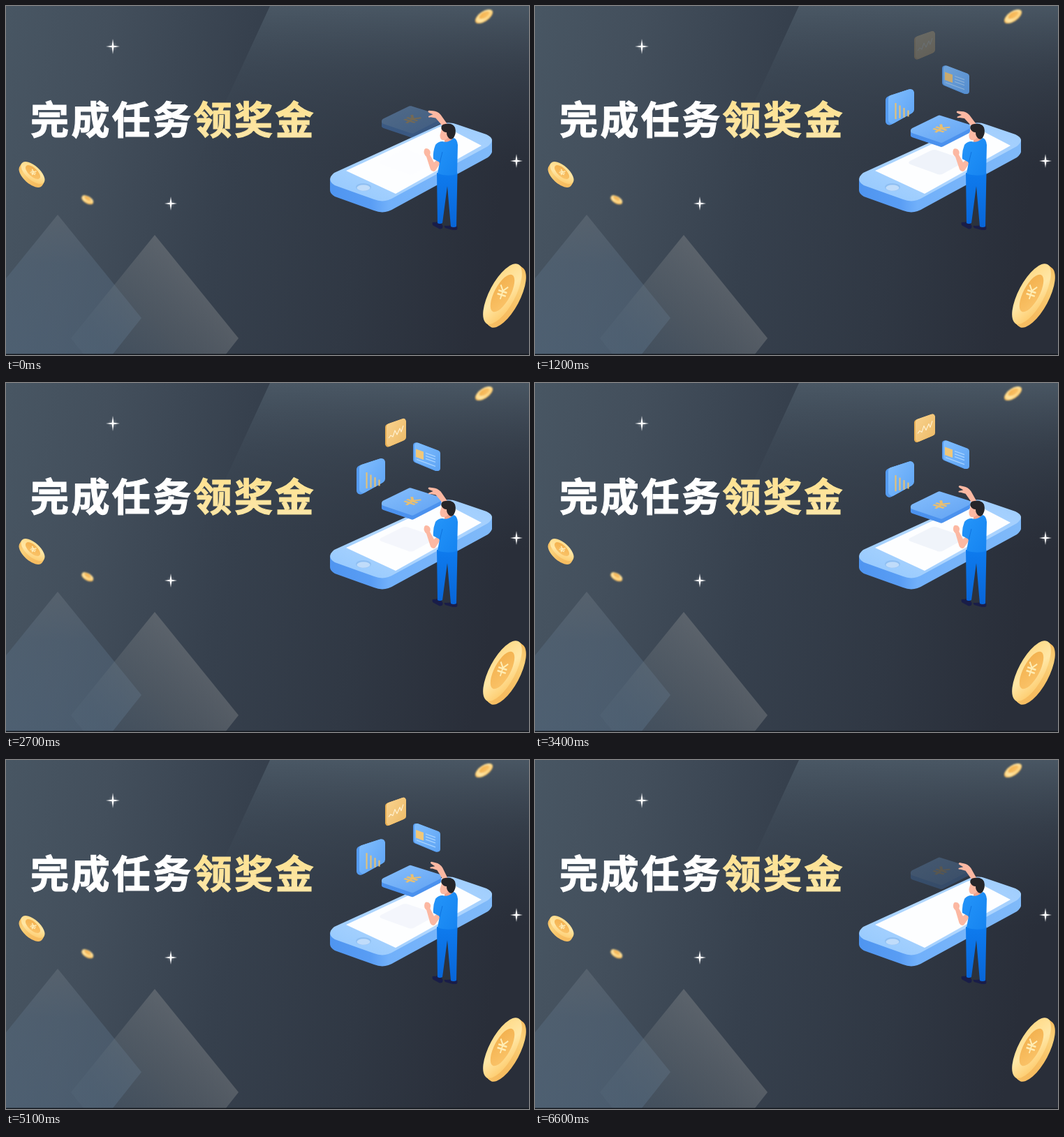
An HTML page for the animation above (6700 ms loop, 749 by 500 pixels).

```html
<!DOCTYPE html>
<html lang="zh">
<head>
<meta charset="utf-8">
<style>
html, body { margin: 0; width: 100%; height: 100%; overflow: hidden; background: #36404c; }
svg { display: block; width: 749px; height: 500px; }
.title { font: 900 55px "Noto Sans CJK SC", "Noto Sans CJK", sans-serif; letter-spacing: 3.4px; stroke-width: 1.2px; }
</style>
</head>
<body>
<svg id="stage" viewBox="0 0 749 500"></svg>
<script>
const LOOP = 6700, STEP = 100, RESET = 6450;

const gradient = (id, [x1, y1, x2, y2], ...stops) =>
  `<linearGradient id="${id}" x1="${x1}" y1="${y1}" x2="${x2}" y2="${y2}">` +
  stops.map(([at, color, alpha = 1]) =>
    `<stop offset="${at}" stop-color="${color}" stop-opacity="${alpha}"/>`).join('') +
  '</linearGradient>';

const shape = (d, fill, extra = '') => `<path d="${d}" fill="${fill}" ${extra}/>`;
const line = (d, color, width, extra = '') =>
  `<path d="${d}" fill="none" stroke="${color}" stroke-width="${width}" ${extra}/>`;

// A rounded slab: its face repeated along the depth direction.
function slab(points, face, side, dx, dy, round) {
  const poly = (x, y, fill) => `<polygon points="${points}" transform="translate(${x} ${y})" ` +
    `fill="${fill}" stroke="${fill}" stroke-width="${round}" stroke-linejoin="round"/>`;
  const depth = Math.max(Math.abs(dx), Math.abs(dy));
  let out = '';
  for (let i = depth; i > 0; i--) out += poly(dx * i / depth, dy * i / depth, side);
  return out + poly(0, 0, face);
}

const yen = (transform, color, width = 3) =>
  `<g transform="${transform}">${line('M-7 -9L0 -2L7 -9M0 -2V10M-8 -1H8M-8 4H8', color, width)}</g>`;

function coin(x, y, rx, ry, turn, dx, dy, mark, blur) {
  const oval = (cx, cy, k, fill) =>
    `<ellipse cx="${cx}" cy="${cy}" rx="${rx * k}" ry="${ry * k}" transform="rotate(${turn} ${cx} ${cy})" fill="${fill}"/>`;
  let edge = '';
  for (let i = 6; i > 0; i--) edge += oval(x + dx * i / 6, y + dy * i / 6, 1, 'url(#coinEdge)');
  return `<g ${blur ? `filter="url(#${blur})"` : ''}>${edge}${oval(x, y, 1, 'url(#coinFace)')}` +
    `${oval(x, y - 1, .62, 'url(#coinCore)')}${mark}</g>`;
}

const sparkle = (x, y, r) => `<g transform="translate(${x} ${y})">
  <circle r="${r * .6}" fill="#fff" opacity=".15" filter="url(#soft)"/>
  ${shape(`M0 ${-r - 2}L1.3 -1.3L${r + 1} 0L1.3 1.3L0 ${r + 2}L-1.3 1.3L${-r - 1} 0L-1.3 -1.3Z`, '#fff')}</g>`;

const defs = `<defs>
  ${gradient('base', [0, 0, 1, .12], [0, '#485663'], [.2, '#434f5c'], [.48, '#36404d'], [.75, '#303844'], [1, '#292e39'])}
  ${gradient('sheen', [0, 0, 0, 1], [0, '#4c5a67', .9], [.4, '#404c59', .5], [1, '#333c48', 0])}
  ${gradient('peakA', [.5, 0, .5, 1], [0, '#717b85', .4], [.35, '#5a6e82', .45], [1, '#587088', .45])}
  ${gradient('peakB', [.12, .8, .85, .35], [0, '#5f7385', .16], [.45, '#71797f', .34], [1, '#898b8d', .48])}
  ${gradient('gold', [0, 0, 0, 1], [0, '#ffe088'], [1, '#fbe7ae'])}
  ${gradient('coinFace', [0, 0, 1, 1], [0, '#ffd780'], [.5, '#ffe7a6'], [1, '#fdc45e'])}
  ${gradient('coinEdge', [0, 0, 1, 1], [0, '#f2a945'], [.6, '#fbd27b'], [1, '#f3ae4e'])}
  ${gradient('coinCore', [0, 0, 1, 1], [0, '#f2af4c'], [1, '#fbc56b'])}
  ${gradient('phoneFace', [0, 1, 1, 0], [0, '#92c7fd'], [.5, '#b3d8ff'], [1, '#9dccfd'])}
  ${gradient('phoneSide', [0, 0, 1, 0], [0, '#4f95f0'], [.25, '#599df4'], [.36, '#71b0fa'], [1, '#80baf9'])}
  ${gradient('blueTop', [0, 0, 1, 1], [0, '#84bdfc'], [1, '#63a4f3'])}
  ${gradient('blueTile', [0, 0, 1, 1], [0, '#7dbbfd'], [1, '#61a6f5'])}
  ${gradient('amber', [0, 0, 1, 1], [0, '#f8d08a'], [1, '#eebd6b'])}
  ${gradient('shirt', [0, 0, 1, 1], [0, '#2596fa'], [1, '#1583f0'])}
  ${gradient('pants', [0, 0, 0, 1], [0, '#0e7bee'], [1, '#0865d8'])}
  <filter id="soft"><feGaussianBlur stdDeviation="1.2"/></filter>
  <filter id="faint"><feGaussianBlur stdDeviation=".8"/></filter>
</defs>`;

const backdrop = `
  <rect width="749" height="500" fill="url(#base)"/>
  ${shape('M378 0H749V240H267Z', 'url(#sheen)')}
  ${shape('M74 299L194 447L152 500H-4L-46 447Z', 'url(#peakA)')}
  ${shape('M213 328L333 476L314 500H112L93 476Z', 'url(#peakB)')}
  <rect y="498.5" width="749" height="1.5" fill="#14181e"/>
  ${sparkle(153, 58, 9)}${sparkle(236, 283, 8)}${sparkle(731, 222, 8)}
  ${coin(685, 14, 13.5, 6.5, -32, -1, 2, '', 'soft')}
  ${coin(117, 277, 9, 4.2, 30, -.5, 1.5, '', 'faint')}
  ${coin(38.5, 239, 21, 10, 42, -3, 5, yen('translate(39 238.5) rotate(25) scale(.5 .4)', '#fff0bd', 3))}
  ${coin(711, 412.5, 18.5, 48, 28, 6, 5, yen('translate(711 410) rotate(18) scale(.8 1.05)', '#ffedb4', 2.3))}
  <text class="title" x="35" y="183" fill="#fff" stroke="#fff">完成任务<tspan fill="url(#gold)" stroke="#fde49a">领奖金</tspan></text>`;

const phoneOutline = 'M470 239L619 171Q633 164 647 170L688 184Q703 191 690 201L556 274Q542 283 527 277L471 257Q458 249 470 239Z';
let phoneSide = '';
for (let y = 16; y > 0; y--) phoneSide += shape(phoneOutline, 'url(#phoneSide)', `transform="translate(0 ${y})"`);

const phone = `${phoneSide}
  ${shape(phoneOutline, 'url(#phoneFace)')}
  ${shape('M487 236L619 174Q625 171 631 174L681 200L558 269Z', '#fdfeff')}
  <ellipse cx="512" cy="259.5" rx="11" ry="5.5" fill="#8fbff2"/>
  <ellipse cx="512" cy="260.5" rx="9.5" ry="4.3" fill="#c0dcfa"/>
  <path id="shade" d="M537 222L567 207Q572 205 577 207L612 219Q617 222 612 225L585 240Q580 243 574 240L538 227Q533 225 537 222Z" fill="#edf1f9"/>`;

// Each tile fades in while falling to its lowest point, then floats.
const tiles = [
  { id: 'pay', lowest: 850, mid: 153, swing: 4, top: 156,
    art: slab('542,178.5 579,160.5 619,173 582,192', 'url(#blueTop)', '#4c92ee', 0, 6, 8) +
      yen('matrix(.95 .3 -.75 .5 581 176)', '#e8bf72', 3.2) },
  { id: 'chart', lowest: 1200, mid: 113.5, swing: 5.5, top: 119,
    art: slab('511.5,133 537.5,124.5 537.5,148.5 511.5,163', 'url(#blueTile)', '#559bf0', -4, 2, 11) +
      [0, 1, 2, 3].map(i => line(`M${516.5 + i * 6} ${139 + i * 3.5}V${162 - i * 1.2}`, '#e2c17a', 2.2)).join('') },
  { id: 'card', lowest: 1750, mid: 86, swing: 4.5, top: 82,
    art: slab('589,87 618,98 618,119.5 589,107.5', 'url(#blueTile)', '#559bf0', -2, 0, 8) +
      shape('M587 92L598 96V107.5L587 103.5Z', '#f0c779') +
      line('M601 98L615 103M601 102L615 107M601 106L615 111M588 107L615 117', '#a8d3ff', 1.3) },
  { id: 'trend', lowest: 2150, mid: 48.7, swing: 5.2, top: 53,
    art: slab('549,64 569,57 569,80 549,88.5', 'url(#amber)', '#e6ae55', -2, 1, 8) +
      line('M548 81L551 77L554 79L557 70L560 76L564 67L566 72L569 63', '#fff0cf', 1.2, 'stroke-linejoin="round"') },
];

const skin = '#fcb8a2';
const person = `
  <g id="wave">
    ${shape('M634 172L622 156Q617 151 611 151L605 150.5Q602 152 606 154L611 156L605 158.5Q603 161 608 160L615 161L626 173Z', skin)}
  </g>
  ${shape('M612 310Q610 309 611 314L621 319.5Q626 319.5 625.5 315L622 309Z', '#191d48')}
  ${shape('M630 315Q626 314 629 318L640 321H645Q648 318 645 314Z', '#191d48')}
  ${shape('M617 239H646.5L645 316Q641 318 637 316L632 258L625 311Q621 313 618 311Z', 'url(#pants)')}
  <g id="fist">
    ${shape('M599 206Q600 203 605 205Q609 208 607 213L613 224L621 217L622 225L615 236Q611 239 608 234L602 216Q597 212 599 206Z', skin)}
  </g>
  ${shape('M628 186H640V197H628Z', '#f3a38c')}
  ${shape('M625 194Q633 197 641 189Q646 190 647 199L646 241Q632 245 618 240L621 224L612 219Q611 209 615 199Q619 194 625 194Z', 'url(#shirt)')}
  ${line('M621 225L625 209', '#0f73de', 1)}
  ${shape('M624 176L621.5 185Q621.5 191 625 192Q631 193 634 187L633 175Z', skin)}
  ${shape('M623.5 176Q622 170 629 169Q639 167 643 174Q645.5 182 641 189Q638 192 635 190Q631 187 631 181Q626 181 623.5 176Z', '#252529')}`;

const stage = document.getElementById('stage');
stage.innerHTML = defs + backdrop + phone +
  tiles.map(tile => `<g id="${tile.id}">${tile.art}</g>`).join('') + person;
const part = id => document.getElementById(id);

const FALL = 1100, DROP = 24, FADE = 700, FLOAT = 3100, SWAY = 1600;
const clamp = v => Math.max(0, Math.min(1, v));

function pose(tile, t) {
  const since = t - tile.lowest;
  const age = since + FALL;
  const y = since < 0
    ? tile.mid + tile.swing - DROP * (1 - clamp(age / FALL)) ** 2
    : tile.mid + tile.swing * Math.cos(2 * Math.PI * since / FLOAT);
  return { y: y - tile.top, alpha: clamp(age / FADE) };
}

function render(ms) {
  const t = Math.floor(ms % LOOP / STEP) * STEP;
  const cycle = t >= RESET ? t - LOOP : t;
  for (const tile of tiles) {
    const { y, alpha } = pose(tile, cycle);
    const node = part(tile.id);
    node.setAttribute('transform', `translate(0 ${y.toFixed(2)})`);
    node.setAttribute('opacity', alpha);
    if (tile.id === 'pay') part('shade').setAttribute('opacity', clamp(alpha * (.85 + y * .05)));
  }
  const sway = 6.5 - 8 * Math.cos(2 * Math.PI * (t / SWAY - .85));
  part('wave').setAttribute('transform', `rotate(${sway} 633 172)`);
  part('fist').setAttribute('transform', `rotate(${sway * .25} 617 222)`);
}

const start = performance.now();
function tick() {
  render(performance.now() - start);
  requestAnimationFrame(tick);
}
tick();
</script>
</body>
</html>
```
